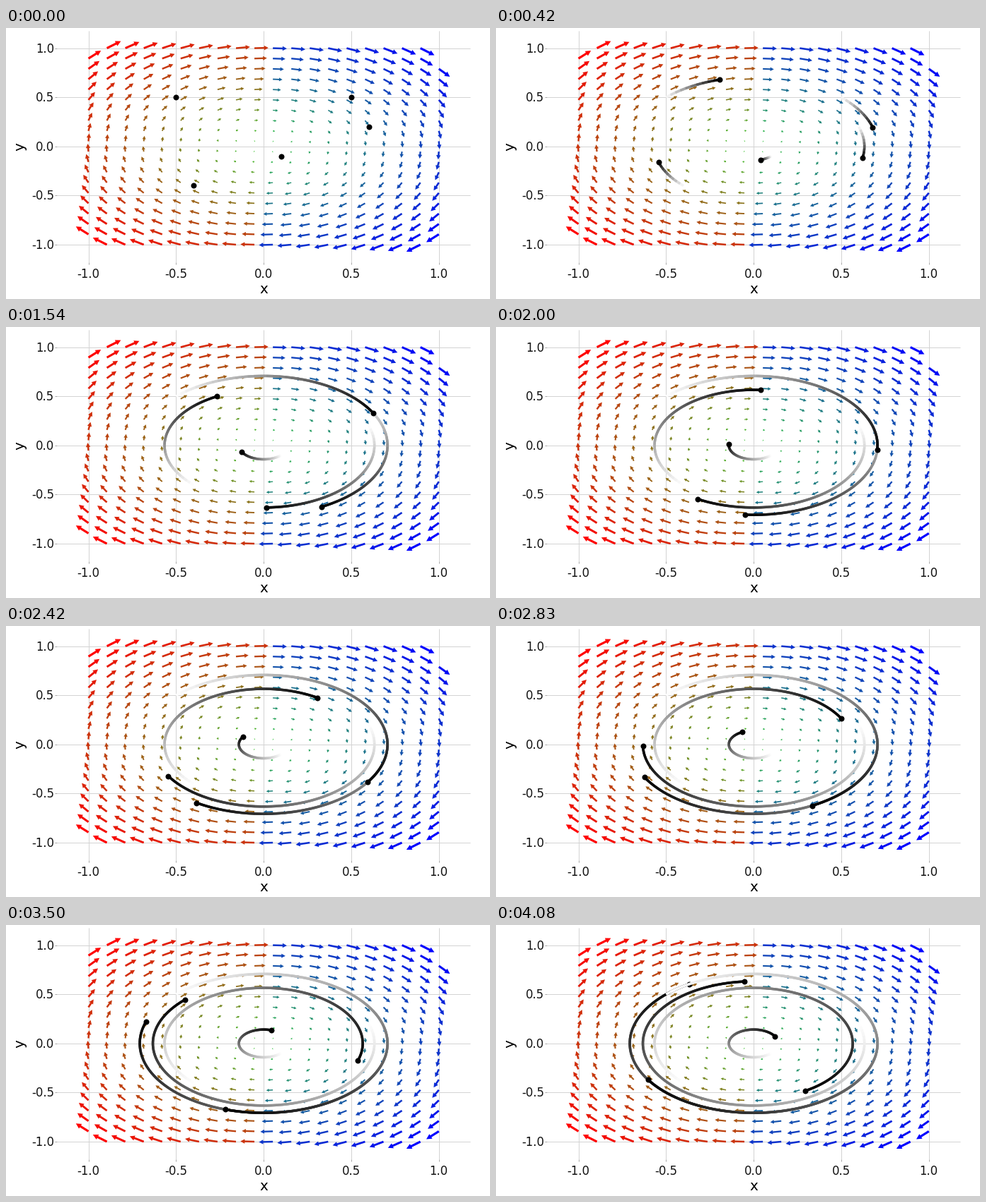
Write a matplotlib script that moves like this. It is 684x384 px and loops after 4120 ms.

```python
import numpy as np
import matplotlib.pyplot as plt
from matplotlib.animation import FuncAnimation
from matplotlib.collections import LineCollection, PolyCollection

W, H, DPI = 684, 384, 96
PX = 72 / DPI                 # points per pixel
LOOP, SLOT = 4120, 20         # ms
STEPS, T_END = 99, 5.0        # solution samples, total time
ORIGIN = np.array([364.1, 167.8])
SCALE = np.array([247.6, -139.2])
TICKS = (-1.0, -0.5, 0.0, 0.5, 1.0)
# trails are painted in this order
STARTS = [(0.5, 0.5), (-0.5, 0.5), (0.1, -0.1), (-0.4, -0.4), (0.6, 0.2)]

plt.rcParams["font.family"] = "DejaVu Sans"
plt.rcParams["axes.unicode_minus"] = False


def to_px(p):
    return ORIGIN + SCALE * np.asarray(p, float)


def flow(p, t):
    """Exact solution of x' = y, y' = -x."""
    c, s = np.cos(t), np.sin(t)
    return np.stack([p[0] * c + p[1] * s, p[1] * c - p[0] * s], axis=-1)


def arrow(p, norm):
    """Outline of a filled arrow along the field at p."""
    tail = to_px(p)
    vec = 0.08 * SCALE * np.array([p[1], -p[0]])
    length = np.hypot(*vec)
    along = vec / length
    side = np.array([-along[1], along[0]])
    shaft = (0.6 + 1.9 * norm) / 2
    head = (2.2 + 4.2 * norm) / 2
    neck = max(length - (1.8 + 4.3 * norm), 0)
    outline = [(0, shaft), (neck, shaft), (neck, head), (length, 0),
               (neck, -head), (neck, -shaft), (0, -shaft)]
    return [tail + a * along + b * side for a, b in outline]


def field():
    axis = np.linspace(-1, 1, 20)
    top = np.hypot(1, axis[-2])
    lime = np.array([50, 205, 50]) / 255
    shapes, colors = [], []
    for x in axis:
        for y in axis:
            norm = np.hypot(x, y)
            if norm > top + 0.01 or (x > 0.99 and y > 0.85):
                continue
            end = np.array([1, 0, 0] if x < 0 else [0, 0, 1])
            mix = min(norm / top, 1)
            shapes.append(arrow((x, y), norm))
            colors.append(lime + (end - lime) * mix)
    return PolyCollection(shapes, facecolors=colors, edgecolors="none", zorder=2)


fig = plt.figure(figsize=(W / DPI, H / DPI), dpi=DPI, facecolor="white")
ax = fig.add_axes([0, 0, 1, 1])
ax.set_xlim(0, W)
ax.set_ylim(H, 0)
ax.axis("off")

for v in TICKS:
    gx, gy = to_px((v, v))
    grid = dict(color="#d3d3d3", lw=PX, zorder=1, solid_capstyle="butt")
    tick = dict(grid, color="#a8a8a8")
    ax.plot([72, 656], [gy, gy], **grid)
    ax.plot([gx, gx], [4, 332], **grid)
    ax.plot([69, 72], [gy, gy], **tick)
    ax.plot([gx, gx], [332, 335], **tick)
    label = dict(fontsize=16.5 * PX, color="#111111")
    ax.text(68, gy + 6, f"{v:.1f}", ha="right", va="baseline", **label)
    ax.text(gx, 354, f"{v:.1f}", ha="center", va="baseline", **label)

ax.text(364, 376, "x", fontsize=20 * PX, ha="center", va="baseline")
ax.text(20, 168, "y", fontsize=20 * PX, ha="center", va="center", rotation=90)
ax.add_collection(field())

times = np.arange(STEPS) * T_END / STEPS
paths = [to_px(flow(p, times)) for p in STARTS]
trails, dots = [], []
for i in range(len(paths)):
    trail = LineCollection([], linewidths=3.5 * PX, zorder=3 + i)
    ax.add_collection(trail)
    dot, = ax.plot([], [], "o", color="black", ms=8 * PX, mew=0, zorder=3.5 + i)
    trails.append(trail)
    dots.append(dot)


def update(i):
    # 24 steps a second, rounded to hundredths
    k = min(int((i * SLOT + 15) * 24 / 1000), STEPS - 1)
    shades = [str(1 - (j + 0.5) / k) for j in range(k)]
    for path, trail, dot in zip(paths, trails, dots):
        # each piece overlaps the next to hide seams
        trail.set_segments([path[j:min(j + 3, k + 1)] for j in range(k)])
        trail.set_color(shades)
        dot.set_data([path[k, 0]], [path[k, 1]])
    return trails + dots


anim = FuncAnimation(fig, update, frames=LOOP // SLOT, interval=SLOT,
                     repeat=True, repeat_delay=0, blit=False)
plt.show()
```
